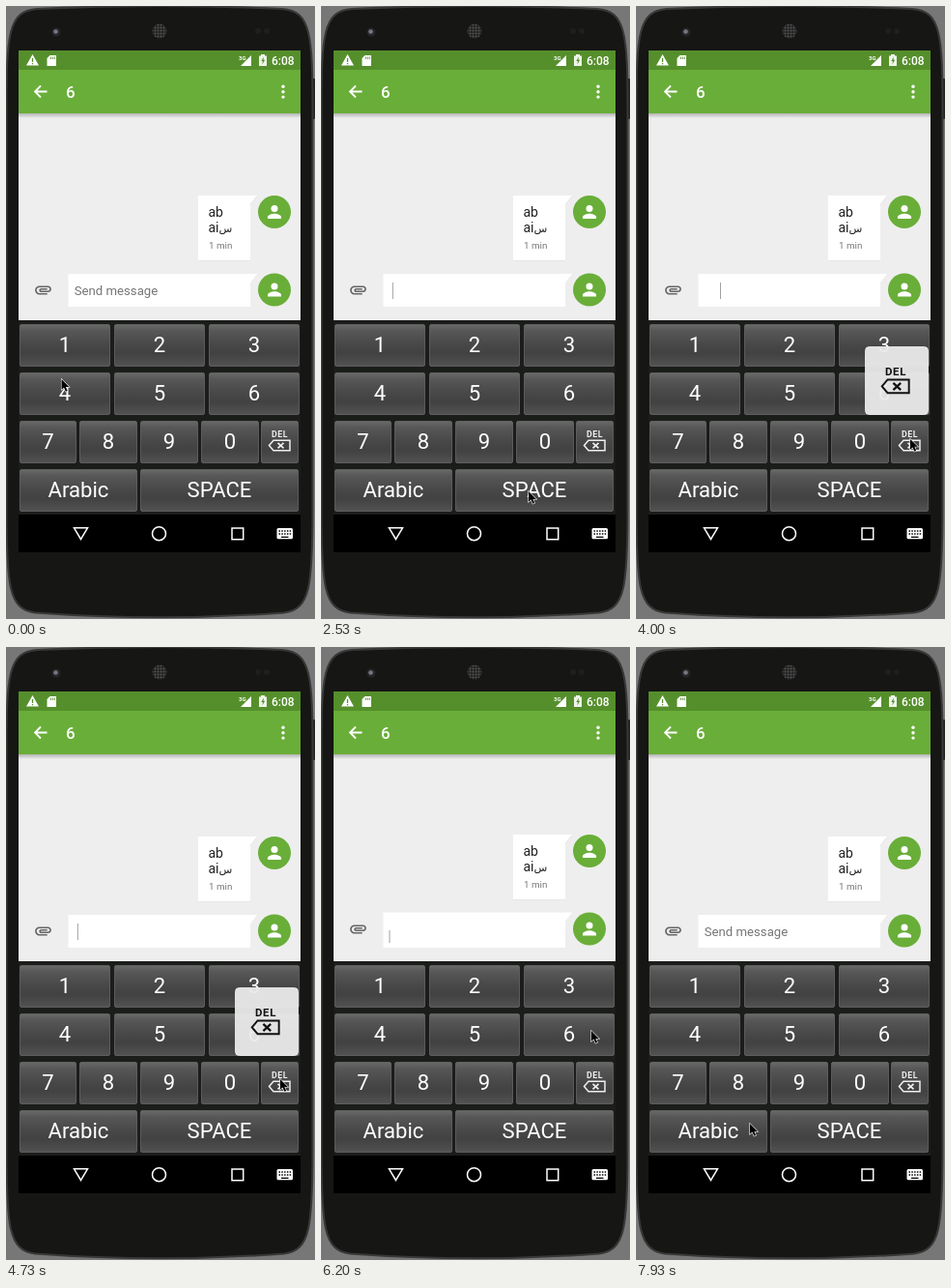
Recreate the animation shown at these times as an HTML page. Size 320x634 px, loop 8 s.

```html
<!DOCTYPE html>
<html lang="en">
<head>
<meta charset="utf-8">
<title>Keypad typing</title>
<style>
  html, body { margin: 0; width: 100%; height: 100%; overflow: hidden; background: #777; }
  svg { display: block; width: 320px; height: 634px; font-family: Roboto, "Noto Sans", sans-serif; }
  .key text { font-size: 22.1px; fill: #fff; text-anchor: middle; }
  .line { fill: none; stroke: currentColor; stroke-width: 1.5; }
</style>
</head>
<body>
<svg viewBox="0 0 320 634">
  <defs>
    <linearGradient id="idle" x2="0" y2="1">
      <stop offset="0" stop-color="#6a6a6a"/><stop offset=".15" stop-color="#575757"/>
      <stop offset=".5" stop-color="#474747"/><stop offset=".7" stop-color="#424242"/>
      <stop offset="1" stop-color="#525252"/>
    </linearGradient>
    <linearGradient id="pressed" x2="0" y2="1">
      <stop offset="0" stop-color="#888"/><stop offset=".5" stop-color="#717171"/>
      <stop offset="1" stop-color="#8a8a8a"/>
    </linearGradient>
    <linearGradient id="shade" x2="0" y2="1">
      <stop offset="0" stop-opacity=".25"/><stop offset="1" stop-opacity="0"/>
    </linearGradient>
    <pattern id="mesh" width="3" height="3" patternUnits="userSpaceOnUse">
      <rect width="3" height="3" fill="#222"/><circle cx="1.5" cy="1.5" r="1" fill="#555"/>
    </pattern>
    <g id="avatar">
      <circle r="17" fill="#69ae38"/>
      <g transform="scale(.88) translate(-12 -12)" fill="#fff">
        <circle cx="12" cy="8" r="4"/>
        <path d="M12 14C9.330 14 4 15.340 4 18V20H20V18C20 15.340 14.670 14 12 14Z"/>
      </g>
    </g>
    <g id="del">
      <text y="-4.5" text-anchor="middle" letter-spacing=".5" style="font-size:8.8px;font-weight:700;fill:currentColor">DEL</text>
      <path class="line" d="M-11 4.5L-6.5-.8H10.5V9.8H-6.5Z"/>
      <path class="line" d="M-2 1.800L4 7.400M4 1.800L-2 7.400" style="stroke-width:1.7"/>
    </g>
  </defs>

  <!-- Phone body -->
  <rect width="320" height="634" fill="#777"/>
  <rect x="316" y="75" width="4" height="42" rx="1" fill="#222"/>
  <path d="M.5 110C.5 30 2 5 32 3Q159-3 286 3C316 5 317.500 30 317.500 110V520C317.500 600 315 624 288 627.500Q159 637 30 627.500C3 624 .5 600 .5 520Z"
    fill="#161614" stroke="#383838" stroke-width="2"/>
  <circle cx="52" cy="27" r="4.5" fill="#262629"/><circle cx="51.500" cy="26.500" r="2.300" fill="#77777f"/>
  <circle cx="159" cy="26" r="7.500" fill="url(#mesh)"/>
  <circle cx="261" cy="26" r="3" fill="#211f1e"/><circle cx="270" cy="26" r="3" fill="#211f1e"/>

  <!-- Status and app bars -->
  <rect x="13" y="46" width="292" height="20" fill="#558f2c"/>
  <rect x="13" y="66" width="292" height="45" fill="#69ae38"/>
  <g fill="#fff">
    <path d="M27.500 50L34 61.500H21Z"/>
    <path d="M27.500 54V58M27.500 59V60.300" stroke="#558f2c" stroke-width="1.300"/>
    <path d="M45.500 51H52V62H42.500V54Z"/>
    <path d="M46.300 52.500V55M48.300 52.500V55M50.300 52.500V55" stroke="#558f2c" stroke-width=".9"/>
    <text x="241" y="56" font-size="6" font-weight="700">3G</text>
    <path d="M254 51V62H243Z"/>
    <path d="M264 51.500V50H268V51.500H270V62H262V51.500Z" opacity=".9"/>
    <path d="M267 52.500L264.300 57H266L265.300 60.500L268.200 55.700H266.500Z" fill="#558f2c"/>
    <text x="275" y="60.500" font-size="12" font-weight="500">6:08</text>
    <path d="M42.500 88.500H30.500M36 82.500L30 88.500L36 94.500" class="line" color="#fff" style="stroke-width:1.8"/>
    <text x="62" y="95" font-size="17" font-weight="500">6</text>
    <circle cx="287" cy="83.300" r="1.700"/><circle cx="287" cy="88.700" r="1.700"/><circle cx="287" cy="94.100" r="1.700"/>
  </g>

  <!-- Conversation -->
  <rect x="13" y="111" width="292" height="214" fill="#eee"/>
  <rect x="13" y="111" width="292" height="5" fill="url(#shade)"/>
  <g id="chat">
    <path d="M199 197H260L253 206V263.600H199Z" fill="#e0e0e0"/>
    <path d="M199 196H260L253 205V263H199Z" fill="#fff"/>
    <g fill="#222" font-size="14">
      <text x="209.500" y="218">ab</text>
      <text x="209.500" y="234" direction="ltr">ai<tspan font-size="11.300" font-family="DejaVu Sans, sans-serif">س</tspan></text>
      <text x="210" y="251" font-size="9.800" fill="#777">1 min</text>
    </g>
    <use href="#avatar" x="278" y="213"/>
    <use href="#avatar" x="278" y="293.500"/>
    <path transform="translate(38.500 294) scale(.84) translate(-12 -12.500)" fill="#666"
      d="M2 12.500C2 9.460 4.460 7 7.500 7H18c2.210 0 4 1.790 4 4s-1.790 4-4 4H9.500C8.120 15 7 13.880 7 12.500S8.120 10 9.500 10H17v2H9.410c-.55 0-.55 1 0 1H18c1.100 0 2-.9 2-2s-.9-2-2-2H7.500C5.570 9 4 10.570 4 12.500S5.570 16 7.500 16H17v2H7.500C4.460 18 2 15.540 2 12.500Z"/>
  </g>
  <path id="field" fill="#fff"/>
  <text id="hint" x="70.700" y="299.300" font-size="13.200" fill="#757575">Send message</text>
  <rect id="caret" width="1" fill="#a0a0a0"/>

  <!-- Keyboard and navigation -->
  <rect x="13" y="325" width="292" height="201" fill="#1b1d1b"/>
  <g id="keys"></g>
  <rect x="13" y="526" width="292" height="39" fill="#000"/>
  <g class="line" color="#fff">
    <path d="M70.500 539.800H84.500L77.500 551.500Z"/>
    <circle cx="158.500" cy="545.700" r="7"/>
    <rect x="234" y="540" width="11.700" height="11.700"/>
  </g>
  <rect x="280.500" y="540" width="16.500" height="11.300" rx="1.500" fill="#fff"/>
  <path d="M282.500 543H295.500M282.500 546H295.500" stroke="#000" stroke-width="1.500" stroke-dasharray="1.500 1.300"/>
  <path d="M285 549.300H292.500" stroke="#000" stroke-width="1.300"/>

  <g id="popup">
    <rect id="popupBox" height="70" rx="4" fill="#ebebeb" fill-opacity=".94" stroke="#f4f4f4" stroke-opacity=".8"/>
    <text id="popupText" font-size="39.300" font-weight="500" text-anchor="middle" fill="#000"></text>
    <use id="popupDel" href="#del" color="#111"/>
  </g>
  <path id="pointer" d="M0 0V10.800L2.500 8.600L4.300 12.800L6.200 12L4.400 7.900H7.900Z" fill="#000" stroke="#fff" stroke-width="1.100" paint-order="stroke"/>
</svg>

<script>
const LOOP = 8000;
const $ = id => document.getElementById(id);
const set = (el, attrs) => { for (const name in attrs) el.setAttribute(name, attrs[name]); };
const show = (el, on) => { el.style.display = on ? '' : 'none'; };

// Key rows: y, then [label, left, right]
const rows = [
  [329, ['1', 14, 108], ['2', 112, 206], ['3', 210, 304]],
  [379, ['4', 14, 108], ['5', 112, 206], ['6', 210, 304]],
  [429, ['7', 14, 73], ['8', 76, 136], ['9', 139, 199], ['0', 202, 262], ['DEL', 264, 303]],
  [479, ['Arabic', 14, 136], ['SPACE', 139, 303]]
];
const keys = {};
for (const [y, ...row] of rows) {
  for (const [label, left, right] of row) {
    keys[label] = { y, left, right };
    const mid = (left + right) / 2;
    const face = label === 'DEL'
      ? `<use href="#del" x="${mid}" y="${y + 21}" color="#eee"/>`
      : `<text x="${mid}" y="${y + 29.3}">${label}</text>`;
    $('keys').innerHTML += `<g class="key"><rect id="key${label}" x="${left + .5}" y="${y + .5}"
      width="${right - left - 1}" height="43" rx="1.5" stroke="#6a6a6a" stroke-opacity=".75"/>${face}</g>`;
  }
}

// [key, pressed, released, popup hidden]
const taps = [
  ['SPACE', 2270, 2330, 2530], ['SPACE', 2670, 2730, 2800], ['SPACE', 2800, 2870, 2930],
  ['SPACE', 2930, 3070, 3130], ['SPACE', 3130, 3200, 3270], ['SPACE', 3270, 3400, 3470],
  ['DEL', 3930, 4000, 4070], ['DEL', 4270, 4330, 4400], ['DEL', 4400, 4470, 4530],
  ['DEL', 4530, 4670, 4670], ['DEL', 4670, 4730, 4870], ['DEL', 4870, 4930, 5000],
  ['6', 5870, 5930, 6000], ['6', 6070, 6130, 6200], ['6', 6270, 6330, 6400],
  ['DEL', 7270, 7730, 7870]
];

// Pointer path: time, x, y
const path = [
  [0, 57.5, 386], [200, 90, 410], [530, 300, 495], [870, 285, 508], [1270, 235, 514],
  [1670, 216, 503], [2070, 215, 502], [3070, 215, 502], [3330, 217, 500], [3470, 217, 500],
  [3800, 284, 448], [4730, 284, 447], [5070, 284, 447], [5330, 284, 425], [5730, 280, 397],
  [6330, 280, 397], [6670, 270, 429], [6730, 266, 439], [6800, 266, 439],
  [7130, 278, 446], [7730, 278, 446], [7930, 118, 493], [8000, 118, 493]
];

function pointerAt(t) {
  const i = Math.max(1, path.findIndex(p => p[0] >= t));
  const [t0, x0, y0] = path[i - 1], [t1, x1, y1] = path[i];
  const k = (t - t0) / (t1 - t0), s = k * k * (3 - 2 * k);
  return [x0 + (x1 - x0) * s, y0 + (y1 - y0) * s];
}

function drawPopup(label) {
  show($('popup'), label);
  if (!label) return;
  const { y, left, right } = keys[label];
  const width = right - left + 26;
  const x = Math.min((left + right - width) / 2, 302.5 - width);
  const mid = x + width / 2, top = y - 76.5;
  set($('popupBox'), { x, y: top, width });
  show($('popupDel'), label === 'DEL');
  set($('popupDel'), { transform: `translate(${mid - 1} ${top + 35}) scale(1.3)` });
  set($('popupText'), { x: mid, y: top + 50.5 });
  $('popupText').textContent = label === 'DEL' ? '' : label;
}

function draw(t) {
  const done = taps.filter(tap => tap[1] <= t);
  const current = done[done.length - 1];
  const spaces = done.reduce((n, [key]) => Math.max(0, n + (key === 'SPACE') - (key === 'DEL')), 0);
  const tall = t >= 5870 && t < 7270;

  set($('chat'), { transform: `translate(0 ${tall ? -2 : 0})` });
  const top = tall ? 274.5 : 277;
  set($('field'), { d: `M64.500 ${top}H260L253 ${top + 9}V311H64.500Z` });
  show($('hint'), !spaces && !tall);

  const since = t - (current ? current[1] : 400);
  show($('caret'), since >= 0 && since % 1000 < 500);
  set($('caret'), { x: 70.5 + 3.3 * spaces, y: tall ? 293 : 286, height: tall ? 13 : 17 });

  for (const label in keys) {
    const down = current && current[0] === label && t < current[2];
    set($('key' + label), { fill: `url(#${down ? 'pressed' : 'idle'})` });
  }
  drawPopup(current && t < current[3] ? current[0] : null);
  set($('pointer'), { transform: `translate(${pointerAt(t)})` });
}

function frame() {
  const step = Math.floor((performance.now() % LOOP + 4) * 15 / 1000) % 120;
  draw(Math.round(step * 100 / 15) * 10);
  requestAnimationFrame(frame);
}
frame();
</script>
</body>
</html>
```
